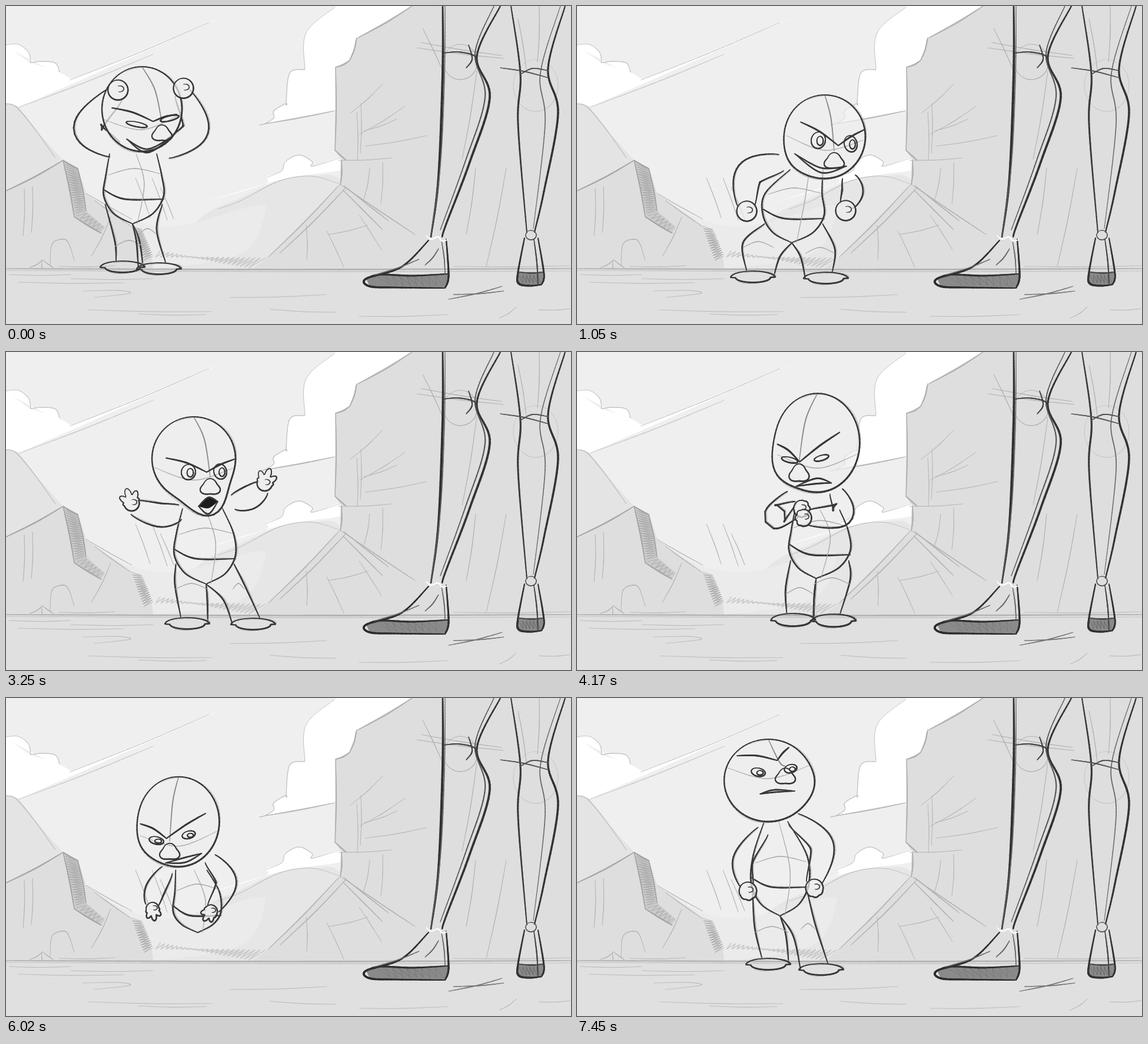
An HTML page with a canvas that plays this animation: 960x540 px, repeating every 7.87 s.

```html
<!DOCTYPE html>
<html lang="en">
<head>
<meta charset="utf-8">
<title>Pencil test</title>
<style>
html, body { margin: 0; width: 100%; height: 100%; overflow: hidden; background: #e0e0e0; }
canvas { display: block; width: 100%; height: 100%; }
</style>
</head>
<body>
<canvas id="stage" width="960" height="540"></canvas>
<script>
const LOOP = 7870, FLOOR = 474;
const stage = document.getElementById('stage').getContext('2d');
let g = stage;

const mix = (a, b, k) => a + (b - a) * k;
const pairs = v => v.flatMap((x, i) => i % 2 ? [] : [[x, v[i + 1]]]);

// Catmull-Rom through the points
function curve(p, n = 32) {
  const last = p.length - 1, at = i => p[Math.max(0, Math.min(last, i))];
  return Array.from({ length: n + 1 }, (_, j) => {
    const u = j / n * last, i = Math.min(last - 1, Math.floor(u)), t = u - i;
    const [a, b, c, d] = [at(i - 1), at(i), at(i + 1), at(i + 2)];
    return [0, 1].map(q => b[q] + t / 2 * (c[q] - a[q] +
      t * (2 * a[q] - 5 * b[q] + 4 * c[q] - d[q] + t * (3 * (b[q] - c[q]) + d[q] - a[q]))));
  });
}

function oval(x, y, rx, ry, tilt = 0, bump = () => 1) {
  return Array.from({ length: 73 }, (_, i) => {
    const a = i / 36 * Math.PI - 2, k = bump(a), u = rx * k * Math.cos(a), v = ry * k * Math.sin(a);
    return [x + u * Math.cos(tilt) - v * Math.sin(tilt), y + u * Math.sin(tilt) + v * Math.cos(tilt)];
  });
}

function trace(p) {
  g.beginPath();
  p.forEach(q => g.lineTo(...q));
}

function fill(p, color) {
  trace(p);
  g.fillStyle = color;
  g.fill();
}

function pencil(p, w = 2.6, color = '#383838') {
  g.strokeStyle = color;
  g.lineCap = 'round';
  for (let i = 1; i < p.length; i++) {
    g.lineWidth = w * (.6 + .45 * Math.sin(Math.PI * i / p.length));
    trace([p[i - 1], p[i]]);
    g.stroke();
  }
}

function sketch(p, w) {
  pencil(p.map(([x, y], i) => [x + 2.5 * Math.sin(i / 9), y + 2 * Math.cos(i / 7)]), 1, '#b4b4b4');
  pencil(p, w);
}

const line = (w, color, ...v) => pencil(curve(pairs(v), 60), w, color);
const area = (color, ...v) => fill(pairs(v), color);

// straight scratches, four numbers each, with a slight bow
function dashes(w, color, ...v) {
  for (let i = 0; i < v.length; i += 4) {
    const [x, y, u, t] = v.slice(i, i + 4);
    line(w, color, x, y, (x + u) / 2 + 1.5, (y + t) / 2 + 1.5, u, t);
  }
}

function blob(color, edge, ...v) {
  const p = curve(pairs(v), 110);
  fill(p, color);
  if (edge) pencil(p, 1.2, edge);
}

// zigzag between the edges ab and cd
function hatch(n, w, color, ax, ay, bx, by, cx, cy, dx, dy) {
  pencil(Array.from({ length: n }, (_, i) => {
    const k = i / n;
    return i % 2 ? [mix(cx, dx, k), mix(cy, dy, k)] : [mix(ax, bx, k), mix(ay, by, k)];
  }), w, color);
}

function sky() {
  area('#efefef', 0, 0, 960, 0, 960, 540, 0, 540);
  blob('#fff', '#c4c4c4', -5, 67, 20, 65, 38, 78, 42, 96, 42, 96, 62, 94, 84, 97, 91, 112, 91, 112, 112, 128);
  area('#fff', 0, 67, 40, 96, 91, 112, 112, 125, 372, 17, 115, 131, 20, 172, 0, 172);
  dashes(1.2, '#c4c4c4', 108, 126, 345, 28, 22, 172, 250, 82);
  blob('#fff', '#c0c0c0', 562, 0, 510, 45, 508, 108, 508, 108, 482, 114, 476, 165, 476, 165, 455, 178, 455, 190, 440, 200, 440, 200, 558, 178);
  area('#fff', 700, 0, 560, 0, 508, 108, 476, 165, 558, 178);
  line(1.4, '#b5b5b5', 440, 200, 500, 190, 558, 178);
}

function hills() {
  blob('#e6e6e6', '', 250, 446, 330, 360, 400, 325, 460, 298, 510, 290, 570, 302, 570, 446, 570, 446);
  blob('#fff', '', 318, 339, 437, 303, 441, 290, 468, 281, 474, 264, 497, 253, 519, 263, 521, 273, 570, 257, 570, 278, 470, 294, 318, 339);
  line(1, '#bcbcbc', 440, 292, 468, 280, 475, 264, 498, 253, 520, 264, 521, 272, 568, 258);
  line(1, '#bcbcbc', 360, 345, 400, 330, 465, 297, 520, 289, 566, 302);
  blob('#ebebeb', '', 120, 316, 215, 364, 300, 372, 420, 340, 440, 350, 400, 420, 250, 446, 120, 446);
}

function rocks() {
  area('#e4e4e4', 0, 165, 20, 170, 50, 210, 97, 262, 0, 314);
  line(1.6, '#c2c2c2', 0, 166, 18, 172, 50, 210, 84, 258);
  area('#dedede', 0, 313, 97, 262, 122, 275, 136, 318, 215, 374, 248, 428, 250, 446, 0, 446);
  area('#cbcbcb', 97, 262, 122, 276, 136, 348, 168, 376, 160, 386, 116, 358);
  hatch(42, 1.3, '#aaa', 100, 264, 120, 356, 122, 276, 134, 350);
  hatch(12, 1.3, '#b0b0b0', 120, 356, 160, 386, 134, 350, 168, 376);
  hatch(30, 1.4, '#aaa', 214, 374, 236, 436, 230, 378, 250, 426);
  dashes(2, '#a5a5a5', 0, 314, 97, 262, 97, 262, 116, 358, 97, 262, 122, 276, 116, 358, 162, 386, 122, 276, 136, 348);
  dashes(1.1, '#b4b4b4', 136, 318, 214, 362, 150, 330, 212, 374, 178, 358, 145, 425, 31, 310, 29, 390, 45, 306, 43, 385,
    220, 292, 245, 360, 248, 292, 274, 364, 262, 308, 285, 362, 40, 444, 62, 431, 62, 431, 80, 444, 60, 432, 60, 465);
  line(1.2, '#b4b4b4', 75, 440, 78, 405, 95, 396, 106, 402, 116, 432);
}

function cliff() {
  area('#dedede', 690, 0, 600, 52, 593, 58, 592, 76, 584, 92, 560, 104, 559, 245, 569, 260, 567, 303, 445, 427, 420, 446, 960, 446, 960, 0);
  dashes(2, '#b0b0b0', 690, 0, 598, 54, 596, 54, 584, 92, 584, 92, 560, 104, 560, 104, 559, 245, 559, 245, 578, 262, 570, 262, 568, 304);
  dashes(1.5, '#b2b2b2', 566, 304, 445, 427, 578, 308, 465, 420, 570, 304, 695, 388, 572, 312, 640, 380, 574, 305, 650, 365);
  dashes(1, '#b6b6b6', 596, 180, 597, 262, 603, 165, 602, 250, 640, 132, 585, 182, 678, 170, 600, 218, 664, 192, 608, 212,
    715, 220, 610, 238, 565, 262, 655, 258, 640, 265, 637, 336, 618, 275, 608, 328, 600, 355, 638, 414, 545, 382, 574, 444,
    548, 388, 615, 372, 510, 372, 511, 430);
}

function ground() {
  area('#e0e0e0', 0, 446, 960, 446, 960, 540, 0, 540);
  hatch(44, 2.2, '#c9c9c9', 262, 416, 420, 446, 250, 426, 445, 428);
  dashes(2.6, '#b2b2b2', 0, 446, 960, 446);
  dashes(1.4, '#c2c2c2', 0, 449, 960, 450, 90, 442, 185, 441, 760, 442, 958, 441);
  dashes(1, '#bababa', 5, 456, 110, 456, 110, 463, 250, 463, 20, 469, 200, 470, 140, 516, 350, 519, 225, 523, 340, 524,
    380, 495, 545, 490, 448, 515, 560, 520, 600, 527, 752, 524, 838, 530, 867, 511, 905, 516, 958, 514);
  line(1, '#bababa', 130, 484, 190, 483, 210, 488, 150, 495);
  dashes(1.6, '#777', 752, 498, 843, 476, 760, 490, 846, 484);
}

function tallLegs() {
  pencil(oval(772, 95, 29, 30), 1, '#aaa');
  pencil(oval(900, 135, 38, 44), 1, '#c4c4c4');
  dashes(1, '#aaa', 698, 71, 845, 89, 705, 62, 842, 84, 708, 38, 742, 110, 850, 275, 816, 442, 798, 275, 782, 388, 800, 110, 775, 260, 906, 0, 903, 95, 870, 22, 884, 108);
  line(4, '#303030', 742, 0, 742, 115, 735, 290, 722, 392);
  line(1.6, '#666', 746, 0, 745, 120, 738, 270, 722, 390);
  line(3.6, '#333', 840, 0, 800, 85, 822, 155, 788, 265, 748, 370, 741, 392);
  line(2, '#555', 829, 0, 797, 80, 814, 155, 780, 265, 738, 380);
  line(2, '#444', 744, 80, 768, 78, 795, 84, 800, 98);
  line(2, '#444', 786, 66, 792, 90, 782, 105);
  line(3, '#383838', 858, 0, 874, 115, 870, 200, 885, 385);
  line(3.4, '#333', 950, 0, 921, 106, 938, 182, 914, 315, 898, 384);
  line(1.6, '#666', 942, 0, 908, 114, 916, 200, 896, 378);
  line(1.8, '#555', 840, 105, 880, 111, 922, 122);
  line(1.8, '#555', 874, 116, 895, 106, 922, 110);
  pencil(oval(892, 389, 9, 8), 1.4, '#555');
  area('#8a8a8a', 612, 463, 625, 456, 690, 458, 750, 454, 751, 470, 745, 479, 660, 479, 618, 476);
  hatch(18, 1, '#777', 632, 460, 742, 458, 648, 474, 748, 474);
  line(3.4, '#2c2c2c', 718, 398, 672, 443, 612, 463, 618, 476, 660, 478, 744, 479);
  line(3, '#303030', 748, 396, 752, 458, 746, 479);
  line(3, '#303030', 614, 462, 635, 456, 690, 458, 750, 455);
  dashes(1.6, '#666', 740, 398, 746, 455, 702, 430, 625, 457, 735, 412, 712, 440);
  line(2, '#fff', 714, 390, 722, 396, 734, 392, 741, 399, 750, 397);
  area('#8a8a8a', 870, 452, 912, 452, 912, 472, 890, 475, 871, 471);
  hatch(12, 1, '#666', 872, 457, 908, 457, 875, 470, 911, 470);
  line(3.4, '#333', 881, 394, 870, 452, 871, 471, 890, 475, 910, 473);
  line(2.8, '#333', 904, 394, 914, 455, 910, 473);
  dashes(2, '#444', 871, 452, 912, 452, 897, 396, 904, 472);
}

function backdrop() {
  const c = document.createElement('canvas');
  c.width = 960;
  c.height = 540;
  g = c.getContext('2d');
  [sky, hills, rocks, cliff, ground, tallLegs].forEach(f => f());
  g = stage;
  return c;
}

// head: centre, radii, bulge angle and size; arms: shoulder, elbow, wrist, width;
// hands: two directions, openness, radius; body: neck, half width, belly, half width, crotch;
// legs: knee and foot, left then right
const stomp = {
  head: [231, 175, 68, 72, 1, 0], brow: [180, 173, 250, 196, 290, 184], eyes: [222, 201, 278, 191, 18, 4],
  nose: [265, 217], mouth: [205, 226, 240, 246, 282, 222, 3],
  armL: [185, 244, 139, 207, 186, 150, 24], armR: [270, 247, 322, 210, 300, 148, 22], hands: [-60, -80, 0, 17],
  body: [216, 251, 40, 217, 312, 51, 215, 370], legs: [185, 400, 198, 452, 256, 380, 260, 455]
};
const glare = {
  head: [421, 222, 69, 71, 2.5, 4], brow: [380, 197, 444, 237, 488, 210], eyes: [410, 228, 465, 234, 12, 14],
  nose: [437, 264], mouth: [370, 251, 415, 279, 458, 272, 4],
  armL: [347, 266, 293, 285, 287, 340, 23], armR: [462, 290, 468, 315, 458, 339, 18], hands: [80, 100, 0, 17],
  body: [390, 278, 28, 368, 345, 52, 365, 402], legs: [282, 402, 299, 469, 438, 412, 423, 471]
};
const shove = {
  head: [391, 219, 67, 66, 2.8, 9], brow: [336, 224, 362, 243, 424, 224], eyes: [345, 243, 392, 247, 16, 3],
  nose: [347, 262], mouth: [355, 279, 378, 277, 402, 280, 2],
  armL: [332, 288, 370, 306, 414, 293, 22], armR: [410, 312, 458, 306, 441, 278, 16], hands: [-80, -70, .9, 15],
  body: [367, 285, 43, 357, 362, 54, 362, 417], legs: [276, 412, 300, 470, 443, 412, 423, 470]
};
const shout = {
  head: [319, 181, 71, 71, 1.25, 30], brow: [272, 180, 341, 204, 388, 182], eyes: [310, 204, 364, 203, 12, 13],
  nose: [347, 230], mouth: [327, 262, 344, 261, 360, 254, 14],
  armL: [296, 272, 262, 277, 216, 264, 20], armR: [386, 255, 414, 247, 437, 230, 20], hands: [-110, -70, .9, 15],
  body: [334, 266, 34, 338, 335, 52, 340, 394], legs: [287, 395, 308, 470, 405, 395, 420, 471]
};
const sulk = {
  head: [386, 188, 72, 75, 2.6, 11], brow: [318, 190, 356, 217, 424, 172], eyes: [339, 214, 393, 211, 14, 4],
  nose: [355, 235], mouth: [350, 254, 385, 246, 410, 249, 4],
  armL: [343, 270, 314, 300, 352, 288, 18], armR: [418, 262, 428, 296, 370, 302, 18], hands: [0, 180, .2, 13],
  body: [386, 290, 38, 390, 342, 52, 384, 394], legs: [332, 410, 345, 466, 442, 395, 414, 467]
};
const lean = {
  head: [312, 229, 68, 74, 2.6, 3], brow: [248, 233, 295, 256, 361, 216], eyes: [278, 262, 333, 250, 12, 7],
  nose: [303, 281], mouth: [295, 298, 328, 294, 357, 278, 4],
  armL: [302, 308, 285, 340, 262, 382, 16], armR: [374, 285, 408, 325, 400, 384, 17], hands: [110, 110, .9, 12],
  body: [342, 300, 22, 354, 362, 36, 358, 403]
};
const sneer = {
  head: [325, 140, 75, 70, .1, 4], brow: [272, 98, 340, 106, 360, 84], eyes: [308, 126, 363, 120, 12, 7],
  nose: [354, 134], mouth: [311, 163, 335, 158, 370, 158, 2],
  armL: [316, 226, 282, 275, 289, 320, 17], armR: [368, 206, 416, 250, 402, 315, 20], hands: [80, 80, .1, 15],
  body: [338, 210, 20, 345, 305, 49, 345, 370], legs: [302, 390, 325, 461, 405, 385, 415, 470]
};

// time, pose, shift in x, stretch from the floor
const KEYS = [
  [0, stomp, 0, 1], [80, stomp, 8, 1.02], [290, stomp, 55, 1.09], [510, stomp, 105, 1], [800, glare, -8, 1.11],
  [880, glare, 0, 1.055], [1050, glare, 0, 1], [1390, glare, 6, .99], [1810, shove, 4, .98], [1930, shove, 0, 1],
  [2040, shove, -4, .98], [2360, shout, -4, 1.02], [3250, shout, 0, 1], [3420, shout, 2, .99], [3840, sulk, 40, 1.02],
  [4090, sulk, 22, 1.12], [4300, sulk, -8, 1.11], [5060, sulk, 0, 1], [5570, sulk, 0, 1], [6150, lean, -55, 1.04],
  [6630, lean, 0, 1], [6890, lean, 8, 1.02], [7280, sneer, 0, 1.02], [7450, sneer, 0, 1], [LOOP, sneer, 0, 1]
];

// drawings are held: end of each run and how many even steps lead to it
const RUNS = [[80, 1], [800, 10], [880, 1], [1390, 3], [2150, 7], [2230, 1], [2360, 1], [2700, 2], [2910, 2],
  [3420, 3], [3840, 4], [4300, 4], [4810, 3], [5060, 1], [5440, 1], [6150, 7], [6230, 1], [6630, 4], [6890, 2],
  [7280, 3], [7450, 1]];
const STEPS = [0];
for (const [end, n] of RUNS) {
  const from = STEPS[STEPS.length - 1];
  for (let i = 1; i <= n; i++) STEPS.push(mix(from, end, i / n));
}

function poseAt(t) {
  let i = 0;
  while (i < KEYS.length - 2 && KEYS[i + 1][0] <= t) i++;
  const [t0, from, x0, s0] = KEYS[i], [t1, to, x1, s1] = KEYS[i + 1];
  const u = (t - t0) / (t1 - t0), k = u * u * (3 - 2 * u), pose = {};
  for (const part in { ...from, ...to }) {
    const a = from[part], b = to[part];
    if (a && b) pose[part] = a.map((v, j) => mix(v, b[j], k));
    else if (k < .5 ? a : b) pose[part] = a || b;
  }
  return { pose, dx: mix(x0, x1, k), s: mix(s0, s1, k) };
}

const PAPER = 'rgba(238,238,238,.7)', FAINT = '#a8a8a8';

function drawBody([nx, ny, nw, bx, by, bw, cx, cy]) {
  for (const d of [-1, 1]) {
    sketch(curve([[nx + d * nw, ny], [bx + d * bw * .93, mix(ny, by, .6)], [bx + d * bw, by + 10],
      [mix(cx, bx + d * bw, .65), mix(by, cy, .7)], [cx, cy]]));
  }
  sketch(curve([[bx - bw, by], [bx - bw * .3, by + 16], [bx + bw, by + 16]]));
  pencil(curve([[bx - bw * .85, by - 25], [bx, by - 36], [bx + bw * .9, by - 27]]), 1.3, FAINT);
  pencil(curve([[nx + 5, ny], [bx + bw * .35, by - 10], [cx + 8, cy]]), 1.3, FAINT);
}

function drawLeg(d, kx, ky, fx, fy, [, , , bx, by, bw, cx, cy]) {
  const ax = fx - d * 12, out = ax + d * 23, inn = ax - d * 23;
  sketch(curve([[bx + d * bw * .95, by + 25], [kx, ky], [out, fy - 20]]));
  sketch(curve([[cx, cy], [mix(cx, inn, .65), mix(cy, fy, .35)], [inn, fy - 8]]));
  pencil(curve([[kx, ky + 8], [(kx + inn) / 2, ky - 2], [inn, ky + 8]]), 1.3, FAINT);
  sketch(oval(fx, fy - 8, 35, 10, 0, a => Math.sin(a) > 0 ? .85 : 1.08));
}

function drawArm([sx, sy, ex, ey, wx, wy, w]) {
  const mid = curve([[sx, sy], [ex, ey], [wx, wy]], 28);
  for (const d of [-1, 1]) {
    sketch(mid.map(([x, y], i) => {
      const [a, b] = [mid[Math.max(0, i - 1)], mid[Math.min(28, i + 1)]];
      const t = Math.atan2(b[1] - a[1], b[0] - a[0]), r = d * w * (.62 + .38 * Math.sin(Math.PI * i / 28));
      return [x - r * Math.sin(t), y + r * Math.cos(t)];
    }));
  }
}

function drawHand([, , , , x, y], deg, open, r) {
  const a0 = deg * Math.PI / 180, cx = x + r * .5 * Math.cos(a0), cy = y + r * .5 * Math.sin(a0);
  const p = oval(cx, cy, r, r, 0, a => {
    const d = Math.atan2(Math.sin(a - a0), Math.cos(a - a0));
    return 1 + open * Math.max(0, Math.cos(d)) * Math.abs(Math.cos(d * 4)) - open * .15;
  });
  fill(p, PAPER);
  pencil(p, 2.4);
  pencil(oval(cx + 3, cy - 2, r * .4, r * .3).slice(0, 45), 1.6, '#555');
}

function drawEye(x, y, rx, ry, tilt) {
  pencil(oval(x, y, rx, ry, tilt), 2.2);
  if (ry > 5) pencil(oval(x + 3, y + 1, rx * .45, ry * .55), 2);
}

function drawHead({ head: [x, y, rx, ry, dir, bulge], brow, eyes, nose: [nx, ny], mouth }) {
  const skull = oval(x, y, rx, ry, 0, a => 1 + bulge / rx * Math.exp(-(((a - dir) / .45) ** 2)));
  fill(skull, PAPER);
  const [e1x, e1y, e2x, e2y, ex, ey] = eyes;
  pencil(curve([[x, y - ry], [mix(x, nx, .65), y - ry * .45], [nx, ny - 18]]), 1.8, '#888');
  pencil(curve([[x - rx * .95, e1y - 8], [x, (e1y + e2y) / 2 + 14], [x + rx * .95, e2y - 6]]), 1.2, FAINT);
  sketch(skull, 2.8);
  const [lx, ly, vx, vy, qx, qy] = brow;
  pencil(curve([[lx, ly], [(lx + vx) / 2, (ly + vy) / 2 - 4], [vx, vy]]), 2.8);
  pencil(curve([[vx, vy], [(qx + vx) / 2, (qy + vy) / 2 - 2], [qx, qy]]), 2.8);
  drawEye(e1x, e1y, ex, ey, .2);
  drawEye(e2x, e2y, ex * .9, ey, -.25);
  pencil(oval(nx, ny, 16, 13, 0, a => 1 + .15 * Math.sin(3 * a)), 2.3);
  const [ax, ay, mx, my, bx, by, gap] = mouth;
  const lip = d => curve([[ax, ay], [mx, my + d], [bx, by]]);
  const top = lip(-gap), low = lip(gap);
  if (gap > 9) fill([...top, ...lip(gap * .3).reverse()], '#1c1c1c');
  pencil(top, 2.5);
  pencil(low, 2.5);
}

function draw(t) {
  const { pose, dx, s } = poseAt(t);
  g.setTransform(1, 0, 0, 1, 0, 0);
  g.drawImage(scene, 0, 0);
  g.setTransform(1, 0, 0, s, dx, FLOOR * (1 - s));
  drawBody(pose.body);
  if (pose.legs) {
    drawLeg(-1, ...pose.legs.slice(0, 4), pose.body);
    drawLeg(1, ...pose.legs.slice(4), pose.body);
  }
  const [left, right, open, r] = pose.hands;
  drawArm(pose.armL);
  drawArm(pose.armR);
  drawHead(pose);
  drawHand(pose.armL, left, open, r);
  drawHand(pose.armR, right, open, r);
}

const scene = backdrop();
let shown = -1;
function tick(now) {
  const t = now % LOOP;
  let i = STEPS.length - 1;
  while (STEPS[i] > t) i--;
  if (i !== shown) draw(STEPS[shown = i]);
  requestAnimationFrame(tick);
}
draw(0);
requestAnimationFrame(tick);
</script>
</body>
</html>
```
